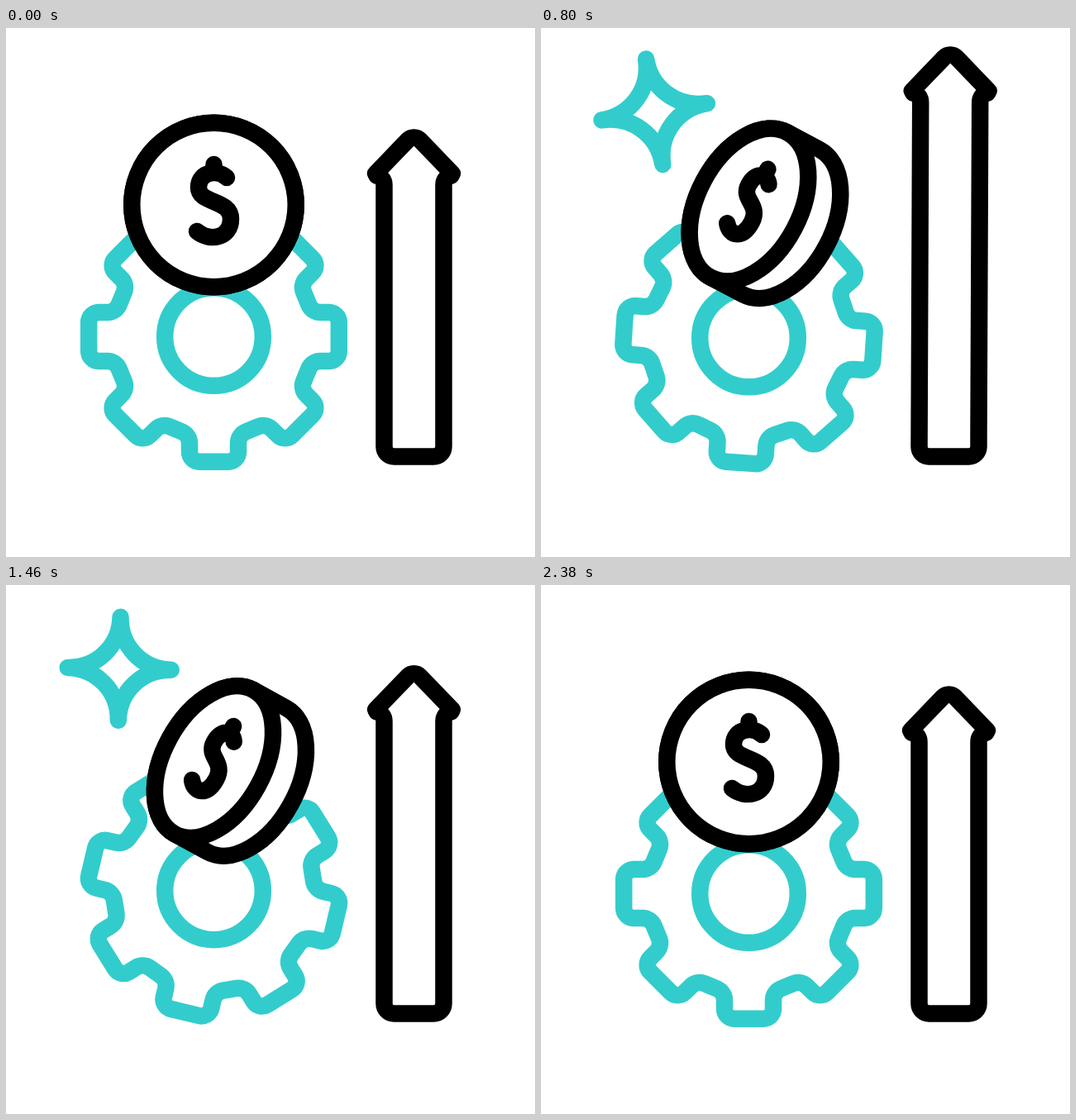
These frames come from a looping animation (640x640 px, 2400 ms). An HTML page with a canvas:

```html
<!DOCTYPE html>
<html lang="en">
<head>
<meta charset="utf-8">
<title>Profit growth icon</title>
<style>
html, body { margin: 0; width: 100%; height: 100%; overflow: hidden; background: #fff; }
canvas { display: block; width: 640px; height: 640px; }
</style>
</head>
<body>
<canvas id="stage" width="640" height="640"></canvas>
<script>
const ctx = document.getElementById('stage').getContext('2d');
const LOOP = 2400;
const TEAL = '#33cccc', BLACK = '#000';
const RAD = Math.PI / 180;

// Shared rhythm in ms: wind up, launch, hang, recoil.
const WIND = 400, LAUNCH = 800, HANG = 1280, RECOIL = 1640;

const span = (t, from, to) => Math.min(1, Math.max(0, (t - from) / (to - from)));
const ease = (t, from, to) => (1 - Math.cos(Math.PI * span(t, from, to))) / 2;
const pulse = (t, from, to) => Math.sin(Math.PI * span(t, from, to)) ** 2;

// Eases from rest through the four poses and back to rest at the settle time.
function sway(t, wind, launch, hang, recoil, settle) {
  return wind * ease(t, 0, WIND)
    + (launch - wind) * ease(t, WIND, LAUNCH)
    + (hang - launch) * ease(t, LAUNCH, HANG)
    + (recoil - hang) * ease(t, HANG, RECOIL)
    - recoil * ease(t, RECOIL, settle);
}

// Builds a path in a local frame, then paints it with an unscaled pen.
function shape(x, y, turn, squeeze, build, color, fill) {
  ctx.save();
  ctx.translate(x, y);
  ctx.rotate(turn * RAD);
  ctx.scale(squeeze, 1);
  ctx.beginPath();
  build();
  ctx.restore();
  if (fill) {
    ctx.fillStyle = '#fff';
    ctx.fill();
  }
  ctx.strokeStyle = color;
  ctx.stroke();
}

function gearOutline() {
  const half = 29.5, root = 118.7, tip = 151.3, step = Math.PI / 4;
  const corners = [[-half, root, 15], [-half, tip, 12], [half, tip, 12], [half, root, 15]];
  const place = (x, y, a) =>
    [x * Math.cos(a) + y * Math.sin(a), y * Math.cos(a) - x * Math.sin(a)];
  const points = [];
  for (let k = 0; k < 8; k++) {
    for (const [x, y, r] of corners) points.push([...place(x, y, k * step), r]);
  }
  ctx.moveTo(...place(0, 121, -step / 2));
  points.forEach(([x, y, r], i) => {
    const next = points[(i + 1) % points.length];
    ctx.arcTo(x, y, next[0], next[1], r);
  });
  ctx.closePath();
}

function drawGear(t) {
  const y = 373.5 + sway(t, -51.5, 1.5, -31.5, 23.7, 1920) + 50 * pulse(t, WIND, LAUNCH);
  const turn = sway(t, -9, 3.8, 11, 15.5, 2020);
  shape(251.5, y, turn, 1, gearOutline, TEAL);
  shape(251.5, y, 0, 1, () => ctx.arc(0, 0, 59.3, 0, 2 * Math.PI), TEAL);
}

function drawArrow(t) {
  const lift = sway(t, -182, 100, 64, -13, 1920) + 95 * pulse(t, WIND, LAUNCH);
  const mid = 493.5 + sway(t, 0.7, 1.7, 0, 0, 1920), y = 176 - lift;
  shape(0, 0, 0, 1, () => {
    ctx.moveTo(493.5, 518.5);
    ctx.arcTo(457.5, 518.5, 457.5, 490, 12);
    ctx.lineTo(mid - 36, y + 14);
    ctx.quadraticCurveTo(mid - 36, y + 5, mid - 45, y + 2.5);
    ctx.lineTo(mid - 46.3, y);
    ctx.arcTo(mid, y - 48, mid + 46.3, y, 10);
    ctx.lineTo(mid + 46.3, y);
    ctx.lineTo(mid + 45, y + 2.5);
    ctx.quadraticCurveTo(mid + 36, y + 5, mid + 36, y + 14);
    ctx.lineTo(529.5, 490);
    ctx.arcTo(529.5, 518.5, 493.5, 518.5, 12);
    ctx.closePath();
  }, BLACK);
}

function dollar() {
  ctx.moveTo(0, -49);
  ctx.lineTo(0, -39);
  ctx.moveTo(15.5, -33);
  ctx.bezierCurveTo(5.5, -43, -18.5, -41, -18.5, -21);
  ctx.bezierCurveTo(-18.5, -1, 20.5, -7, 20.5, 17);
  ctx.bezierCurveTo(20.5, 40, -4.5, 45, -20.5, 32);
}

function drawCoin(t) {
  const tilt = sway(t, 0.115, 0.9, 1, 0.86, 2020), r = 99.2;
  const squeeze = 1 - 0.417 * tilt, depth = 49 * tilt / squeeze;
  const part = (build, fill) => shape(251.5, 214, 31 * tilt, squeeze, build, BLACK, fill);
  part(() => {
    ctx.arc(depth, 0, r, -Math.PI / 2, Math.PI / 2);
    ctx.arc(0, 0, r, Math.PI / 2, Math.PI * 1.5);
    ctx.closePath();
  }, true);
  part(() => ctx.arc(0, 0, r, 0, 2 * Math.PI), true);
  part(dollar);
}

function drawStar(t) {
  const born = 480, gone = 2080;
  if (t <= born || t >= gone) return;
  const pop = 32 * pulse(t, born, LAUNCH) + 41 * pulse(t, RECOIL, gone);
  const r = 64.5 * ease(t, born, LAUNCH) - 2 * ease(t, LAUNCH, HANG)
    - 62.5 * ease(t, RECOIL, gone) + pop;
  const turn = -40 + 31 * ease(t, born, LAUNCH) + 9 * ease(t, LAUNCH, HANG)
    + 2.5 * ease(t, HANG, RECOIL) + 38 * ease(t, RECOIL, gone);
  const c = r * 0.44;
  shape(137.2, 101.3, turn, 1, () => {
    ctx.moveTo(0, -r);
    ctx.bezierCurveTo(0, -c, c, 0, r, 0);
    ctx.bezierCurveTo(c, 0, 0, c, 0, r);
    ctx.bezierCurveTo(0, c, -c, 0, -r, 0);
    ctx.bezierCurveTo(-c, 0, 0, -c, 0, -r);
    ctx.closePath();
  }, TEAL);
}

const start = performance.now();

function frame() {
  const t = (performance.now() - start) % LOOP;
  ctx.fillStyle = '#fff';
  ctx.fillRect(0, 0, 640, 640);
  ctx.lineWidth = 20.5;
  ctx.lineCap = ctx.lineJoin = 'round';
  drawGear(t);
  drawArrow(t);
  drawCoin(t);
  drawStar(t);
  requestAnimationFrame(frame);
}
frame();
</script>
</body>
</html>
```
